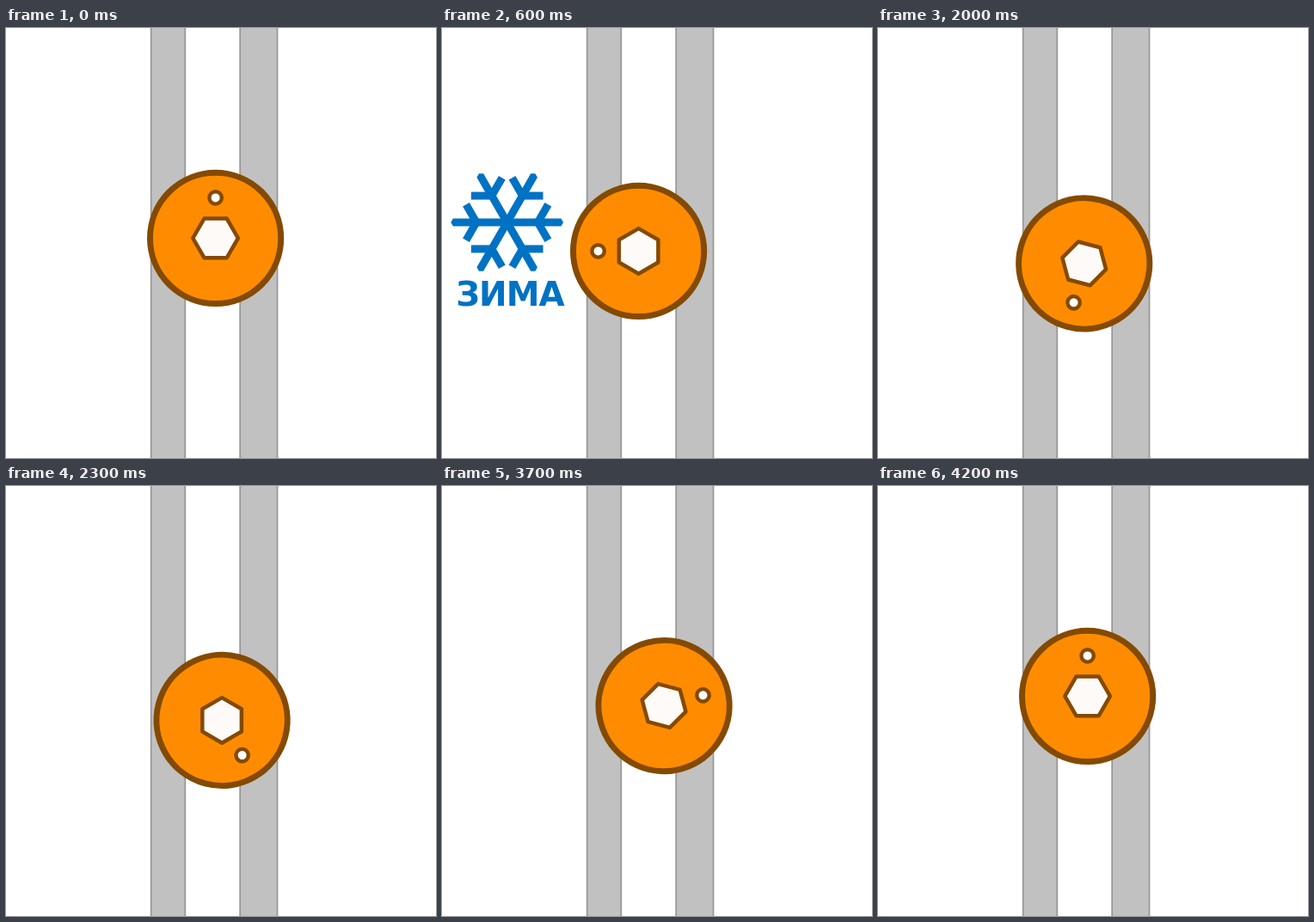
An HTML page that plays this animation: 500x500 px, repeating every 4.3 s.

```html
<!DOCTYPE html>
<html lang="ru">
<head>
<meta charset="utf-8">
<style>
html, body { margin: 0; width: 100%; height: 100%; overflow: hidden; background: #fff; }
svg { display: block; width: 100%; height: 100%; }
text { font: bold 39px "DejaVu Sans", Verdana, sans-serif; letter-spacing: -1px; text-anchor: middle; }
.bar { fill: #c1c1c1; stroke: #989898; stroke-width: 1.8; }
.cam { stroke: #844a02; stroke-linejoin: round; }
#winter { fill: #0072c4; }
#summer { fill: #ff8c00; }
</style>
</head>
<body>
<svg viewBox="0 0 500 500">
  <rect class="bar" x="168.7" y="-5" width="39.6" height="510"/>
  <rect class="bar" x="272.2" y="-5" width="43.3" height="510"/>
  <g id="winter">
    <g id="flake" transform="translate(75.7 226)"></g>
    <text x="79" y="323">ЗИМА</text>
  </g>
  <g id="summer">
    <g id="sun" transform="translate(407 226)"><circle r="33"/></g>
    <text x="407" y="324">ЛЕТО</text>
  </g>
  <g id="cam" class="cam">
    <circle r="76.1" cy="-15" fill="#ff8c00" stroke-width="7"/>
    <polygon id="hex" fill="#fdfaf8" stroke-width="4.5"/>
    <circle r="7.2" cy="-62" fill="#fff" stroke-width="4.4"/>
  </g>
</svg>
<script>
const $ = id => document.getElementById(id);

function addPath(parent, d, transform) {
  const p = document.createElementNS("http://www.w3.org/2000/svg", "path");
  p.setAttribute("d", d);
  p.setAttribute("transform", transform);
  parent.append(p);
}

// Snowflake: six pointed arms, each with two side branches
for (let i = 0; i < 6; i++) {
  const turn = `rotate(${i * 60})`;
  addPath($("flake"), "M0-4.5H62.8L65.4 0 62.8 4.5H0Z", turn);
  for (const side of [-60, 60])
    addPath($("flake"), "M0-4.5H24V4.5H0Z", `${turn} translate(35.7) rotate(${side})`);
}

// Sun: eight flames leaning in alternating pairs
const flame = "M-8-36.5C-12-46-4-54 3-58C2-48 13-48 10-35.5Q1-39-8-36.5Z";
[1, -1, -1, 1, 1, -1, -1, 1].forEach((lean, i) =>
  addPath($("sun"), flame, `rotate(${i * 45}) scale(${lean} 1)`));

$("hex").setAttribute("points", Array.from({ length: 6 }, (_, i) => {
  const a = i * Math.PI / 3;
  return [26.3 * Math.cos(a), 26.3 * Math.sin(a) - 15];
}).join(" "));

// 15 degrees per 100 ms, resting for a second at each season
function draw(now) {
  const tick = Math.floor(now % 4300 / 100);
  const winter = tick >= 6 && tick < 16;
  const summer = tick >= 27 && tick < 37;
  let step = tick;
  if (step > 6) step = Math.max(6, step - 9);
  if (step > 18) step = Math.max(18, step - 9);
  $("cam").setAttribute("transform", `translate(243.6 259.4) rotate(${-15 * step})`);
  $("winter").style.display = winter ? "" : "none";
  $("summer").style.display = summer ? "" : "none";
}

const start = performance.now();
function loop() {
  draw(performance.now() - start);
  requestAnimationFrame(loop);
}
loop();
</script>
</body>
</html>
```
